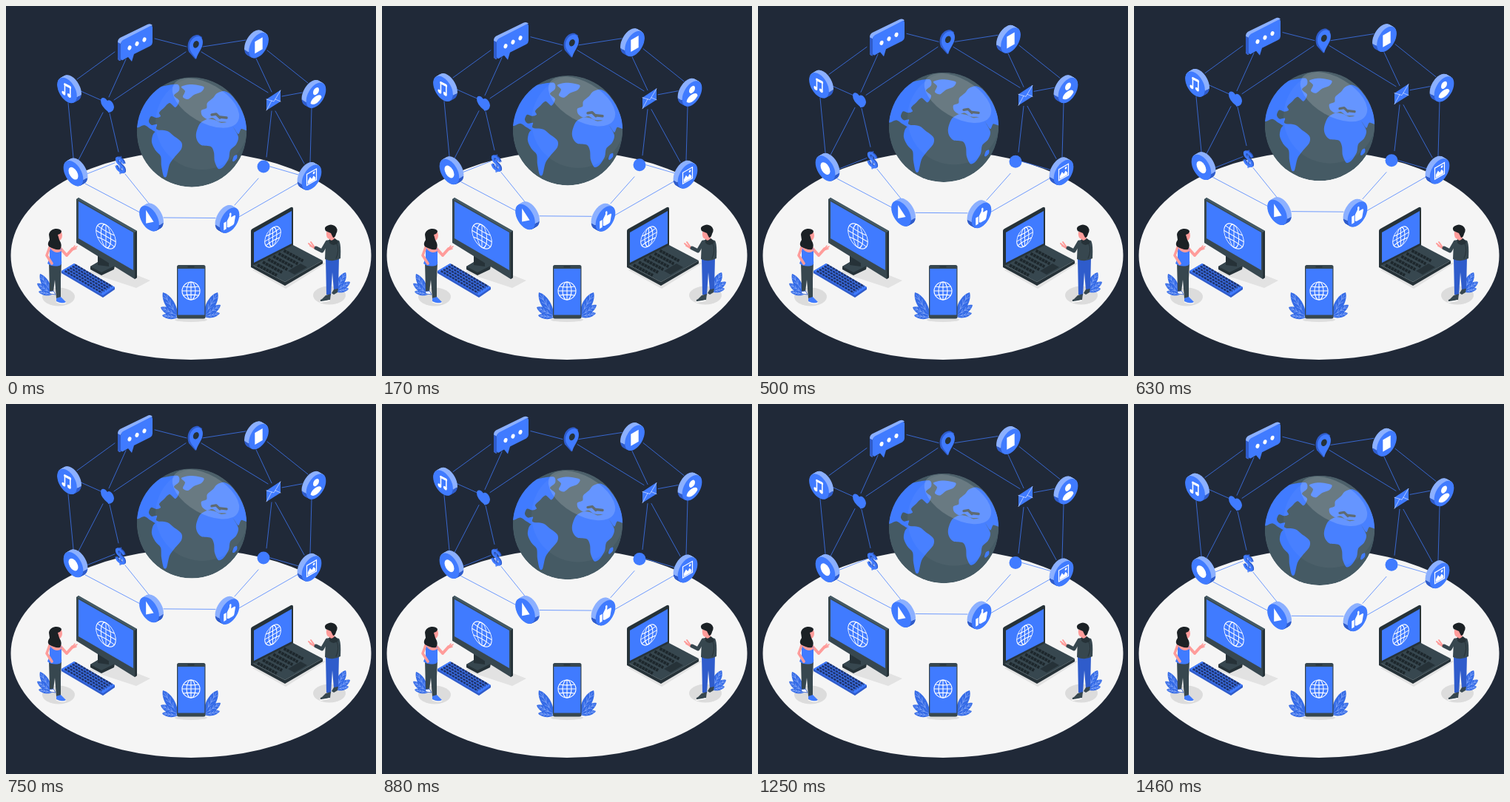
An HTML page for the animation above (1.5 s loop, 500x500 px).

```html
<!DOCTYPE html>
<html lang="en">
<head>
<meta charset="utf-8">
<title>Connected world</title>
<style>
  html, body { margin: 0; height: 100%; overflow: hidden; background: #202938; }
  svg { display: block; width: 100vw; height: 100vh; }
</style>
</head>
<body>
<svg id="stage" viewBox="0 0 500 500"></svg>
<script>
const BLUE = '#407bff', LIGHT = '#8cb0ff', SHADE = '#2f5ccb';
const DARK = '#263238', GREY = '#37474f', SLATE = '#455a64', SKIN = '#ff9c9a';
const ISO_RIGHT = '.866,-.5,0,1', ISO_LEFT = '.866,.5,0,1';

const path = (d, fill, extra = '') => `<path d="${d}" fill="${fill}" ${extra}/>`;
const poly = (points, fill, extra = '') => `<polygon points="${points}" fill="${fill}" ${extra}/>`;
const line = (d, stroke, width, extra = '') =>
  path(d, 'none', `stroke="${stroke}" stroke-width="${width}" stroke-linecap="round" stroke-linejoin="round" ${extra}`);
const ellipse = (x, y, rx, ry, fill, extra = '') =>
  `<ellipse cx="${x}" cy="${y}" rx="${rx}" ry="${ry}" fill="${fill}" ${extra}/>`;
const place = (matrix, x, y, content) => `<g transform="matrix(${matrix},${x},${y})">${content}</g>`;

// Smooth closed curve through the given points
function blob(text, fill) {
  const p = text.split(' ').map(s => s.split(',').map(Number)), n = p.length;
  let d = 'M' + p[0];
  for (let i = 0; i < n; i++) {
    const [a, b, c, e] = [p[(i + n - 1) % n], p[i], p[(i + 1) % n], p[(i + 2) % n]];
    const out = b.map((v, k) => v + (c[k] - a[k]) / 7), into = c.map((v, k) => v - (e[k] - b[k]) / 7);
    d += `C${out} ${into} ${c}`;
  }
  return path(d + 'Z', fill);
}

// Side 1 faces right, -1 faces left
function coin(x, y, side, icon) {
  let rim = '';
  for (let k = -1; k < 1; k += .2)
    rim += place(ISO_RIGHT, 3 * k, 1.7 * k, '<circle r="15.5" fill="url(#rim)"/>');
  const face = `<circle r="15.4" fill="${BLUE}"/><g transform="scale(${side},1)">${icon}</g>`;
  return `<g transform="translate(${x},${y}) scale(${side},1)">${rim}${place(ISO_RIGHT, 3, 1.7, face)}</g>`;
}

function leaf(x1, y1, x2, y2, w) {
  const dx = x2 - x1, dy = y2 - y1, len = Math.hypot(dx, dy), nx = -dy / len * w, ny = dx / len * w;
  const at = (f, s) => `${x1 + dx * f + nx * s},${y1 + dy * f + ny * s}`;
  let veins = `M${at(0, 0)}L${at(.9, 0)}`;
  for (const f of [.3, .5, .7])
    veins += `M${at(f + .15, .55)}L${at(f, 0)}L${at(f + .15, -.55)}`;
  return path(`M${at(0, 0)}C${at(.3, 1.4)} ${at(.8, 1.3)} ${at(1, 0)}C${at(.8, -1.3)} ${at(.3, -1.4)} ${at(0, 0)}`, '#356be6')
    + line(veins, '#a9c3ff', .5);
}

const wireGlobe = r => `<g fill="none" stroke="#fff" stroke-width="1.1"><circle r="${r}"/>
  <ellipse rx="${r * .5}" ry="${r}"/>
  <path d="M0 ${-r}V${r}M${-r} 0H${r}M${-r * .85} ${-r * .5}Q0 ${-r * .35} ${r * .85} ${-r * .5}
    M${-r * .85} ${r * .5}Q0 ${r * .35} ${r * .85} ${r * .5}"/></g>`;

const icons = {
  music: line('M-3.5 6V-7L5-7.5V5', '#fff', 1.8) + line('M-3.5-6L5-6.5', '#fff', 3)
    + ellipse(-5.4, 6.4, 2.8, 2.4, '#fff') + ellipse(3.2, 5.4, 2.8, 2.4, '#fff'),
  disc: '<circle r="7.5" fill="#fff"/>',
  square: '<rect x="-6" y="-8" width="12" height="16" fill="#fff"/>',
  pointer: poly('-5,-9 -5,9 7,1', '#fff'),
  user: '<circle cy="-5.5" r="4.6" fill="#fff"/>' + path('M-8.5 7C-8.5-1 8.5-1 8.5 7Q5 11 0 11T-8.5 7', '#fff'),
  photo: '<rect x="-7.5" y="-8" width="15" height="15" fill="none" stroke="#fff" stroke-width="1.4"/>'
    + path('M-6 6V2L-2.5-2L.5 2L3-1L6 3V6Z', '#fff') + '<circle cx="3.5" cy="-4.5" r="1.6" fill="#fff"/>',
  thumb: path('M-9-1H-5V9H-9ZM-3.8-1L0-6V-9Q2-11 3-7.5L2.5-3H8Q10-2 9 0L7.5 7Q7 9 5 9H-1L-3.8 7.5Z', '#fff')
};

const links = `M201 44L244 55M266 55L324 46M264 62L354 117M243 62L146 127M147 62L96 99M162 72L139 123
  M338 71L359 116M353 60L408 104M373 122L400 117M101 115L128 127M84 131L91 205M131 144L98 208
  M140 145L152 197M109 227L147 212M107 240L181 279M161 227L194 268M213 286L283 286.5M309 269L341 233
  M313 286L395 239M357 217L395 228M359 142L352 204M364 142L403 213M413 138L411 211`;

const earth = `<g clip-path="url(#earth)">
  ${ellipse(251, 170.5, 74.2, 74.2, SLATE)}
  ${blob('176,164 180,146 188,128 201,113 214,108 232,106 234,114 227,121 234,128 229,137 221,131 213,138 207,144 209,149 203,151 196,149 193,156 197,161 204,160 203,166 209,169 204,171 195,166 187,161', BLUE)}
  ${blob('237,109 250,106 267,109 264,116 254,120 246,126 239,123 242,115', BLUE)}
  ${blob('199,173 206,168 218,169 226,175 237,184 237,193 228,204 221,214 217,230 213,230 210,216 209,203 202,195 197,184', BLUE)}
  ${blob('265,148 264,141 271,138 272,131 280,124 285,118 295,115 305,121 316,136 323,152 327,168 318,166 314,173 307,164 298,157 287,156 279,151 272,153', BLUE)}
  ${blob('257,172 262,159 272,153 282,154 291,158 302,157 308,165 314,177 311,187 303,195 301,206 294,217 287,220 282,210 281,198 277,190 264,188 258,181', BLUE)}
  ${blob('306,209 308,203 312,201 312,206 308,210', BLUE)}
  ${line('M278 147L284 146L289 151M289 150L298 151', GREY, 3.4)}
  ${ellipse(265, 158, 63, 63, '#fff', 'opacity=".04"')}
  ${ellipse(270, 131, 50, 26, '#fff', 'opacity=".16" transform="rotate(30 270 131)"')}
</g>`;

const bubble = path('M151 49Q151 45 154 43L191 25Q195 23 198 26L155 50V74Q151 74 151 70Z', LIGHT)
  + path('M151 49L155 51V74Q151 74 151 70Z', SHADE)
  + path('M155 51Q155 48 158 46L195 27Q198 26 198 29V49Q198 52 195 54L173 65L170 75L165 69L158 73Q155 74 155 71Z', BLUE)
  + [[167, 56.5], [177, 51], [187, 45.5]].map(([x, y]) => ellipse(x, y, 2.4, 3.2, '#fff', `transform="rotate(20 ${x} ${y})"`)).join('');

const pin = path('M256 72L247 62C242 49 251 38 260 39L265 42Z', SHADE)
  + path('M257 72C254 66 248 62 248 55C248 46 255 40 261 41C267 43 267 51 264 57C261 63 259 65 257 72Z', BLUE)
  + ellipse(256.8, 52, 3.7, 5, DARK, 'transform="rotate(25 257 52)"');

const heart = path('M138 143Q128 135 128 128C128 122 134 123 137 128C140 125 146 131 146 137Q145 144 138 144Z', BLUE);

const mail = poly('352,126 371,113.5 371,129 352,141', BLUE)
  + line('M352 126L362 129L371 114M352 141L359 128M371 129L364 126', '#dbe6ff', .7);

const dollar = [[1.5, SHADE], [0, BLUE]].map(([shift, fill]) => place(ISO_LEFT, 154 + shift, 225 - shift / 2,
  `<text text-anchor="middle" font-family="Liberation Sans, Arial, sans-serif" font-weight="700" font-size="29" fill="${fill}">$</text>`)).join('');

const network = line(links, BLUE, .75) + earth + bubble + pin + heart + mail + dollar
  + ellipse(348, 217, 8.5, 8.5, BLUE)
  + coin(85.5, 112.3, -1, icons.music) + coin(94, 224.5, -1, icons.disc)
  + coin(196.5, 285.5, -1, icons.pointer) + coin(338.5, 51.5, 1, icons.square)
  + coin(416, 119, 1, icons.user) + coin(410, 230, 1, icons.photo) + coin(299, 288, 1, icons.thumb);

function keys(x, y, dx, dy, stepX, stepY, rows, fill, width) {
  let d = '';
  for (let i = 0; i < rows; i++) d += `M${x + i * stepX} ${y + i * stepY}l${dx} ${dy}`;
  return path(d, 'none', `stroke="${fill}" stroke-width="${width}" stroke-dasharray="3.6 .8"`);
}

const monitor = poly('112,360 135,347 195,371 176,381', '#e2e2e2')
  + poly('114,352 131,342 147,351 146,356 129,364 114,356', DARK)
  + poly('114,352 131,342 147,351 129,360', GREY) + poly('124,332 139,339 139,352 124,350', DARK)
  + path('M95 261L98 259L177 304V367L174 369L95 320Z', GREY)
  + poly('98,259 177,304 174,306 96,261', SLATE)
  + poly('98,264 172,306 172,357 98,314', BLUE)
  + poly('174,306 177,304 177,367 174,369', DARK)
  + place(ISO_LEFT, 135, 311, wireGlobe(15.3));

const keyboard = poly('75,358 92,348 147,380 147,383 131,394 75,361', SHADE)
  + poly('75,358 92,348 147,380 131,391', BLUE)
  + keys(79.5, 358, 50, 29.5, 3.4, -2.1, 5, '#1f3570', 2.7);

const laptop = poly('333,357 388,328 432,348 378,382', '#e2e2e2')
  + poly('331,349 377,373 428,344 428,348 377,378 331,353', DARK)
  + poly('331,349 386,322 428,344 377,373', GREY)
  + keys(340, 350, 26, 14, 7.1, -3.9, 6, '#1d272c', 4)
  + poly('381,358 398,348 407,353 390,363', DARK)
  + path('M331 304Q331 302 333 301L385 272Q388 271 388 274V323L331 352Z', DARK)
  + poly('335,306 386,277 386,321 335,347', BLUE)
  + place(ISO_RIGHT, 360.5, 312, wireGlobe(12.5));

const phone = ellipse(250, 424, 22, 3, '#dedede')
  + leaf(232, 420, 212, 387, 6) + leaf(232, 419, 209, 407, 4.5) + leaf(232, 421, 211, 418, 3.5)
  + leaf(268, 419, 286, 387, 6) + leaf(268, 419, 290, 404, 4.5) + leaf(268, 420, 289, 415, 3.5)
  + `<rect x="231" y="350" width="38.5" height="72.5" rx="2.5" fill="${GREY}"/>
     <rect x="232.3" y="355" width="36" height="62.5" fill="${BLUE}"/>`
  + line('M246 352.5H254', DARK, 1.3)
  + `<g transform="translate(250,385)">${wireGlobe(12)}</g>`;

const woman = ellipse(71, 393, 22, 12.5, '#dcdcdc')
  + leaf(62, 390, 46, 362, 5) + leaf(62, 389, 42, 375, 4) + leaf(62, 390, 44, 386, 3)
  + path('M58 346L75 347L74 368L74 394L68 395L66 370L64 386L59 386Z', GREY)
  + path('M58 386L64 385L67 390L60 389Z', '#fff', `stroke="${SHADE}" stroke-width=".8"`)
  + path('M68 395L74 393L81 400Q76 403 68 399Z', BLUE) + line('M68 400Q76 404 81 401', '#fff', 1)
  + line('M74 328L82 337L90 328', SKIN, 4) + line('M88 330L96 325M89 329L93 324M89 330L95 328', SKIN, 1.6)
  + path('M59 328Q67 323 75 328V344Q76 350 72 351Q62 353 56 348L59 340Z', BLUE)
  + line('M59 326L55 337L62 348', SKIN, 3.6) + path('M60 322L72 320L75 331Q68 336 61 329Z', SKIN)
  + ellipse(70.5, 310, 5.5, 7.5, SKIN)
  + path('M58 309C59 300 72 299 75 304Q75 308 70 309L72 316Q77 324 73 329Q66 330 58 325Q55 322 59 316Z', '#1b2125');

const man = ellipse(437, 391, 22, 12.5, '#dcdcdc')
  + leaf(446, 384, 459, 360, 5) + leaf(446, 385, 465, 373, 4) + leaf(446, 386, 463, 382, 3)
  + path('M432 340L450 340L449 383L443 384L441 360L439 391L433 390Z', SHADE)
  + path('M432 391L439 389L438 397L426 400Q423 397 427 396Z', GREY) + line('M425 400L437 398', '#fff', 1.3)
  + path('M443 383L449 382L448 387L443 390L440 388Z', GREY)
  + line('M418 328L411 324M416 327L409 321M417 326L412 319', SKIN, 2)
  + line('M434 319L427 331L419 327', GREY, 5)
  + path('M432 318Q439 313 450 317Q453 322 452 341Q442 347 431 342Z', GREY)
  + line('M447 321Q451 330 446 341', DARK, 1) + path('M437 314Q446 311 449 320Q442 326 437 320Z', DARK)
  + path('M433 305H444V314Q440 319 437 315Q432 314 433 305Z', SKIN)
  + path('M432 304Q429 299 434 297Q439 294 444 297Q450 301 446 308Q445 313 442 313L439 307Z', '#1b2125');

document.getElementById('stage').innerHTML = `
  <defs>
    <linearGradient id="rim" x2="0" y2="1">
      <stop offset=".56" stop-color="${LIGHT}"/><stop offset=".56" stop-color="${SHADE}"/>
    </linearGradient>
    <clipPath id="earth"><circle cx="251" cy="170.5" r="74.2"/></clipPath>
  </defs>
  <rect width="500" height="500" fill="#202938"/>
  ${ellipse(250, 337, 243.5, 141, '#f5f5f5')}
  <g id="network">${network}</g>
  ${monitor}${keyboard}${laptop}${phone}${woman}${man}`;

// The network rises and sinks 10 px at constant speed, at 24 pictures a second
const LOOP = 1500, STEPS = 36, RISE = 10;
const floating = document.getElementById('network');
const start = performance.now();

function draw(now) {
  const time = Math.max(0, now - start) % LOOP;
  const step = Math.floor((time + 4) / LOOP * STEPS) % STEPS;
  const phase = (step + .8) / STEPS;
  const lift = RISE * (1 - Math.abs(1 - 2 * phase));
  floating.setAttribute('transform', `translate(0 ${(.45 - lift).toFixed(2)})`);
  requestAnimationFrame(draw);
}
draw(start);
</script>
</body>
</html>
```
